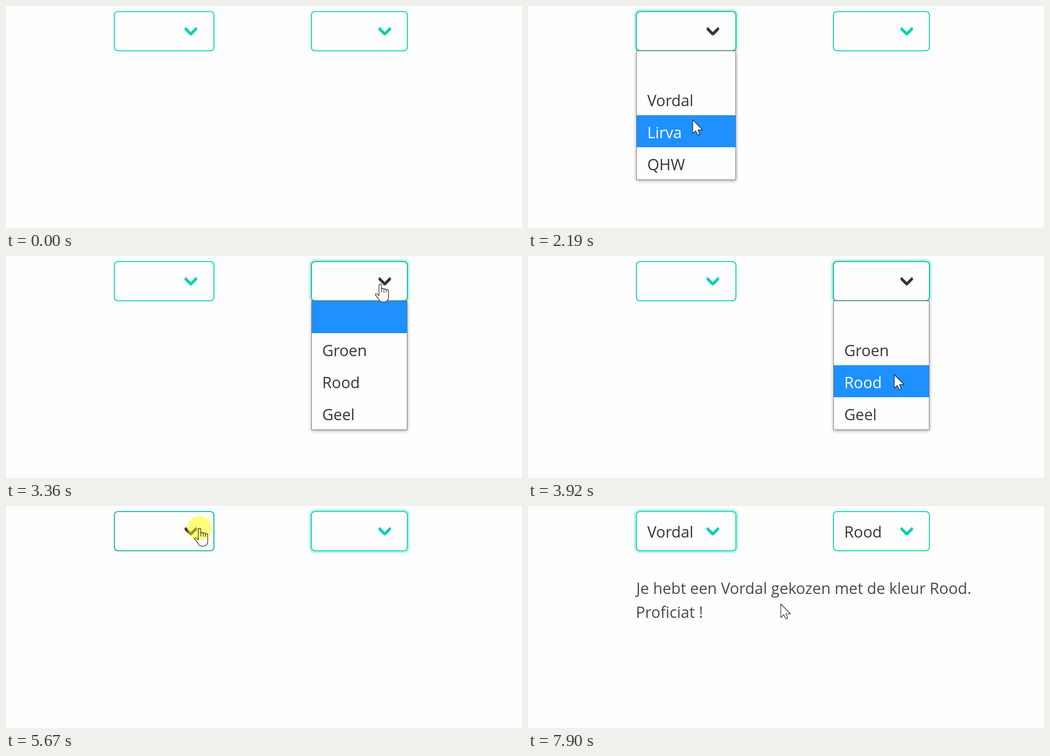
Animation, 1139 px wide and 492 px high, one loop 8 s. Source, as an HTML page with a canvas:

```html
<!DOCTYPE html>
<html lang="nl">
<head>
<meta charset="utf-8">
<title>Keuzelijsten</title>
<style>
  html, body { margin: 0; width: 100%; height: 100%; overflow: hidden; background: #fefefe; }
  canvas { display: block; }
</style>
</head>
<body>
<canvas id="stage" width="1139" height="492"></canvas>
<script>
const ctx = document.getElementById('stage').getContext('2d');
const LOOP = 8000, STEP = 77;
const TEAL = '#00d1b2', TEAL_DARK = '#00b297', INK = '#363636', GREY = '#4a4a4a';
const BLUE = '#1e90ff', PAPER = '#fefefe';
const TOP = 12.2, BOTTOM = 99.3, ROW = 71, LIST_TOP = 99.5, LIST_BOTTOM = 385;

const selects = [
  { x: 239.2, r: 459, arrow: 408, options: ['', 'Vordal', 'Lirva', 'QHW'], choice: 'Vordal' },
  { x: 674, r: 886, arrow: 836, options: ['', 'Groen', 'Rood', 'Geel'], choice: 'Rood' },
];

// Pointer moves: first and last step in ms, goal, and whether it ends in a click
const moves = [
  [70, 781, 413, 60, true],
  [860, 910, 409.5, 60],
  [1880, 2260, 360, 268],
  [2420, 2574, 390, 325],
  [2651, 3190, 830, 61, true],
  [3280, 3358, 826, 62],
  [3436, 4060, 806, 292],
  [4150, 4690, 924, 54],
  [4920, 5087, 838, 150, true],
  [5170, 5670, 427, 49, true],
  [5730, 6220, 372, 214, true],
  [6360, 6510, 353, 262],
  [7610, 7900, 558, 217],
];

const ease = p => p * p * (3 - 2 * p);
const within = (p, s, top, bottom) => p.x > s.x && p.x < s.r && p.y > top && p.y < bottom;
const selectAt = p => selects.findIndex(s => within(p, s, TOP, BOTTOM));
const overList = p => p.open >= 0 && within(p, selects[p.open], LIST_TOP, LIST_BOTTOM);

// A click takes effect on the step after it
function press(s) {
  const hit = selectAt(s);
  if (hit >= 0) return { ...s, open: hit, row: 0, focus: hit };
  return { ...s, open: -1, done: s.open === 0 };
}

function play() {
  let state = { t: 0, x: 905, y: 405, open: -1, row: 0, focus: -1, click: false, done: false };
  const steps = [state];
  for (const [start, end, x, y, click = false] of moves) {
    const from = state, n = Math.round((end - start) / STEP);
    for (let k = 0; k <= n; k++) {
      const e = ease((k + 1) / (n + 1));
      if (state.click) state = press(state);
      state = {
        ...state,
        t: start + (end - start) * k / n,
        x: from.x + (x - from.x) * e,
        y: from.y + (y - from.y) * e,
        click: click && k === n,
      };
      if (overList(state)) state.row = Math.floor((state.y - LIST_TOP) / ROW);
      steps.push(state);
    }
  }
  return steps;
}

function text(str, x, y, color) {
  ctx.fillStyle = color;
  ctx.font = '34.1px "Open Sans", "Noto Sans", sans-serif';
  ctx.fillText(str, x, y);
}

function roundBox(x, y, r, b, radius) {
  ctx.beginPath();
  ctx.roundRect(x, y, r - x, b - y, radius);
}

function chevron(x, color) {
  const h = 11.2, w = 6.4;
  ctx.save();
  ctx.translate(x, 51);
  ctx.rotate(-Math.PI / 4);
  roundBox(-h, -h, h, h, 4.5);
  ctx.clip();
  ctx.fillStyle = color;
  ctx.fillRect(-h, -h, w, 2 * h);
  ctx.fillRect(-h, h - w, 2 * h, w);
  ctx.restore();
}

function drawSelect(s, hover, focused, value) {
  if (focused) {
    roundBox(s.x - 3, TOP - 3, s.r + 3, BOTTOM + 3, 11);
    ctx.lineWidth = 4.5;
    ctx.strokeStyle = 'rgba(0,209,178,.27)';
    ctx.stroke();
  }
  roundBox(s.x, TOP, s.r, BOTTOM, 8);
  ctx.lineWidth = 2;
  ctx.strokeStyle = hover ? TEAL_DARK : TEAL;
  ctx.stroke();
  text(value, s.x + 24, 70, INK);
  chevron(s.arrow, hover ? INK : TEAL);
}

function drawList(s, row) {
  const x = Math.floor(s.x) + .5, w = Math.round(s.r) - .5 - x, h = LIST_BOTTOM - LIST_TOP;
  ctx.save();
  ctx.shadowColor = 'rgba(0,0,0,.4)';
  ctx.shadowBlur = 8;
  ctx.shadowOffsetY = 2;
  ctx.fillStyle = PAPER;
  ctx.fillRect(x, LIST_TOP, w, h);
  ctx.restore();
  ctx.lineWidth = 1;
  ctx.strokeStyle = '#6c6c6c';
  ctx.strokeRect(x, LIST_TOP, w, h);
  ctx.fillStyle = BLUE;
  ctx.fillRect(x + .5, LIST_TOP + .5 + row * ROW, w - 1, ROW);
  s.options.forEach((name, i) => text(name, s.x + 24, 151 + i * ROW, i === row ? '#fff' : INK));
}

const ARROW = new Path2D('M0 0V30L6.5 24L11 33.3L15.3 31.5L11.4 22H21.4Z');
const HAND = new Path2D(
  'M-2.6 24V3Q-2.6 .3 .2 .3Q3 .3 3 3V12Q3.3 9.6 5.7 9.6Q8.3 9.6 8.3 12.5' +
  'Q8.6 10.6 10.8 10.6Q13.3 10.6 13.3 14Q13.8 12.3 15.7 12.3Q18.4 12.3 18.4 16V28' +
  'Q18.4 40.2 7 40.2Q.5 40.2 -2.7 35Q-5 30.5 -10.2 24.5Q-11.5 22 -9.3 21.3Q-6.5 20.8 -2.6 26Z' +
  'M3 11V18.5M8.3 12V19M13.3 13.5V19');

function drawPointer(s) {
  const shape = selectAt(s) >= 0 ? HAND : ARROW;
  ctx.save();
  ctx.translate(s.x, s.y);
  if (s.click) {
    ctx.fillStyle = 'rgba(255,255,0,.5)';
    ctx.beginPath();
    ctx.arc(0, 0, 26.8, 0, 2 * Math.PI);
  } else {
    ctx.fillStyle = '#fff';
  }
  s.click ? ctx.fill() : ctx.fill(shape);
  ctx.strokeStyle = '#111';
  ctx.lineWidth = 1.2;
  ctx.lineJoin = 'round';
  ctx.stroke(shape);
  ctx.restore();
}

function draw(s) {
  const [car, color] = selects;
  ctx.fillStyle = PAPER;
  ctx.fillRect(0, 0, 1139, 492);
  if (s.done) {
    text(`Je hebt een ${car.choice} gekozen met de kleur ${color.choice}.`, 239, 194.5, GREY);
    text('Proficiat !', 238, 248, GREY);
  }
  selects.forEach((box, i) => {
    const hover = selectAt(s) === i || (s.open === i && overList(s));
    drawSelect(box, hover, s.focus === i, s.done ? box.choice : '');
  });
  if (s.open >= 0) drawList(selects[s.open], s.row);
  if (s.t > 0) drawPointer(s);
}

const steps = play();
const origin = performance.now();
function tick() {
  const t = (performance.now() - origin) % LOOP;
  draw(steps.filter(s => s.t <= t + 6).pop());
  requestAnimationFrame(tick);
}
tick();
</script>
</body>
</html>
```
